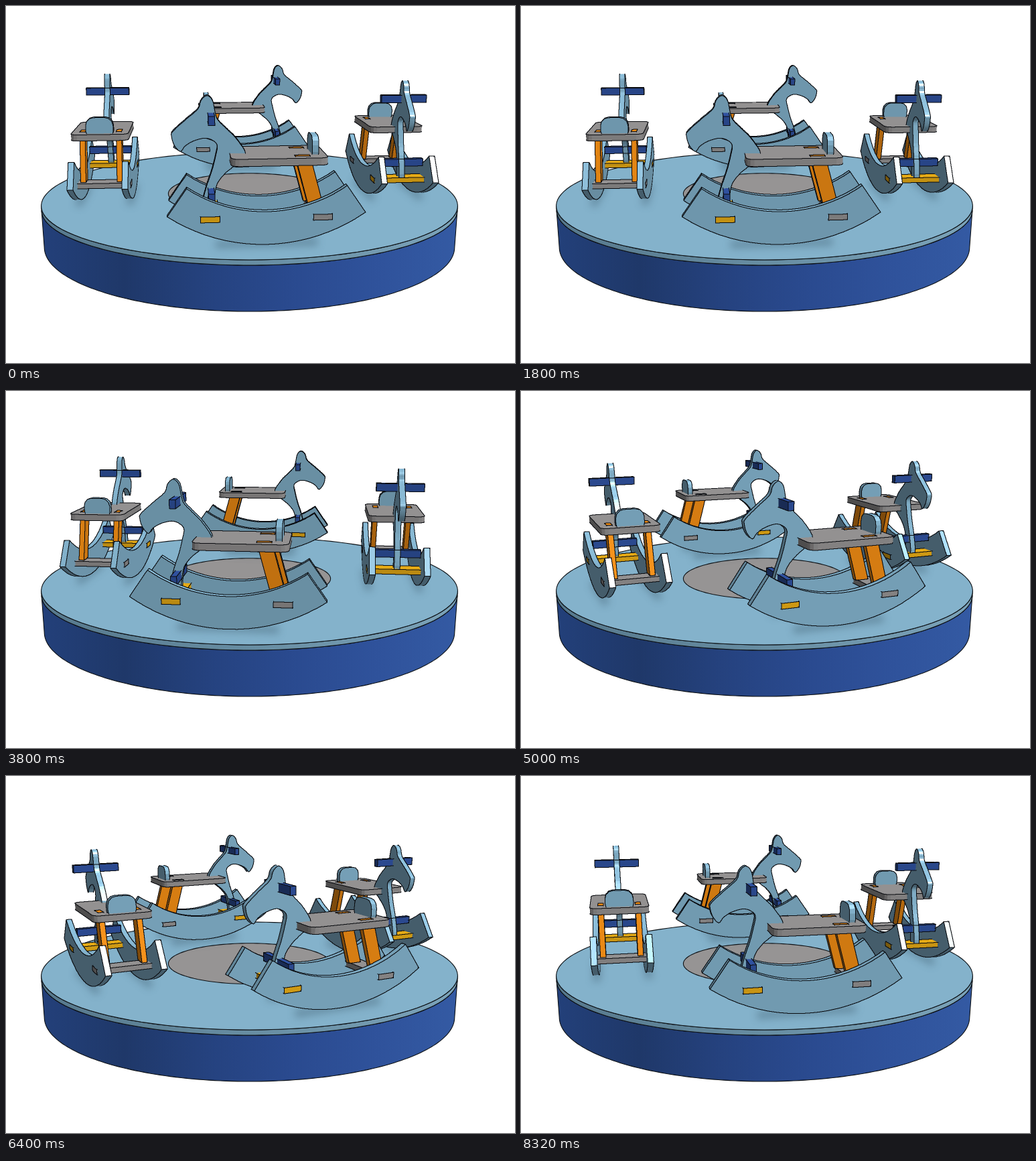
Animation of 760x533 px, one loop 8630 ms. Source, as an HTML page with a canvas:

```html
<!DOCTYPE html>
<html lang="en">
<head>
<meta charset="utf-8">
<title>Rocking horse carousel</title>
<style>
html, body { margin: 0; width: 100%; height: 100%; overflow: hidden; background: #fff; }
canvas { display: block; }
</style>
</head>
<body>
<canvas id="stage" width="760" height="533"></canvas>
<script>
const ctx = document.getElementById('stage').getContext('2d');
const LOOP = 8630, HOLD = 200, RAD = Math.PI / 180;

// Camera: platform radius is 1, origin at the centre of its top
const F = 1078, CX = 363.5, CY = 276.85, DIST = 3.6, SIN = 0.2493, COS = 0.9685;
const toCam = (x, y, z) => [x, y * SIN + z * COS, DIST + y * COS - z * SIN];
const toScreen = p => [CX + F * p[0] / p[2], CY - F * p[1] / p[2]];

const SKY = [131, 178, 204], GREY = [148, 146, 146], GOLD = [232, 172, 22],
      ORANGE = [240, 140, 20], NAVY = [48, 82, 160];

// ---- Horse mesh, local axes: u forward, w outward, z up ----
const faces = [], edges = [];
const AXES = {
  u: (p, q, h) => [h, p, q],
  w: (p, q, h) => [p, h, q],
  z: (p, q, h) => [p, q, h]
};

function prism(poly, axis, a, b, color) {
  const n = poly.length;
  const lo = poly.map(([p, q]) => AXES[axis](p, q, a));
  const hi = poly.map(([p, q]) => AXES[axis](p, q, b));
  faces.push({ pts: lo, color }, { pts: hi, color });
  for (let i = 0; i < n; i++) {
    const j = (i + 1) % n, [x, y] = poly[i];
    const prev = poly[(i + n - 1) % n], next = poly[j];
    faces.push({ pts: [lo[i], lo[j], hi[j], hi[i]], color });
    edges.push([lo[i], lo[j]], [hi[i], hi[j]]);
    const turn = Math.atan2(next[1] - y, next[0] - x) - Math.atan2(y - prev[1], x - prev[0]);
    if (Math.cos(turn) < 0.6) edges.push([lo[i], hi[i]]);
  }
}

const rect = (x0, y0, x1, y1) => [[x0, y0], [x1, y0], [x1, y1], [x0, y1]];

function roundRect(x0, y0, x1, y1, r) {
  const pts = [];
  [[x1 - r, y1 - r], [x0 + r, y1 - r], [x0 + r, y0 + r], [x1 - r, y0 + r]].forEach(([x, y], i) => {
    for (let k = 0; k < 4; k++) {
      const a = (i * 90 + k * 30) * RAD;
      pts.push([x + r * Math.cos(a), y + r * Math.sin(a)]);
    }
  });
  return pts;
}

// Closed Catmull-Rom curve through the points
function smooth(pts, parts = 4) {
  const n = pts.length, out = [];
  for (let i = 0; i < n; i++) {
    const [a, b, c, d] = [-1, 0, 1, 2].map(k => pts[(i + k + n) % n]);
    for (let s = 0; s < parts; s++) {
      const t = s / parts;
      out.push([0, 1].map(m => b[m] + 0.5 * t * (c[m] - a[m] +
        t * (2 * a[m] - 5 * b[m] + 4 * c[m] - d[m] + t * (3 * (b[m] - c[m]) + d[m] - a[m])))));
    }
  }
  return out;
}

function rocker() {
  const pts = [];
  for (let a = -35; a <= 35; a += 3.5) pts.push([0.668, a]);
  for (let a = 35; a >= -35; a -= 3.5) pts.push([0.536, a]);
  return pts.map(([r, a]) => [r * Math.sin(a * RAD), 0.668 - r * Math.cos(a * RAD)]);
}

const head = smooth([
  [.219, .564], [.234, .559], [.247, .543], [.258, .513], [.303, .475], [.356, .428],
  [.361, .408], [.352, .375], [.329, .349], [.310, .370], [.278, .389], [.234, .400],
  [.203, .391], [.185, .370], [.191, .333], [.207, .271], [.232, .198], [.248, .117],
  [.206, .117], [.198, .168], [.187, .217], [.157, .257], [.123, .285], [.074, .330],
  [.109, .394], [.148, .435], [.181, .469], [.191, .495], [.201, .545]
]);

for (const side of [-1, 1]) {
  prism(rocker(), 'w', side * 0.105, side * 0.131, SKY);
  prism([[-.229, .117], [-.171, .117], [-.110, .3395], [-.168, .3395]], 'w', side * 0.07, side * 0.094, ORANGE);
}
prism(rect(.183, .094, .257, .117), 'w', -.133, .133, GOLD);
prism(rect(-.253, .094, -.179, .117), 'w', -.133, .133, GREY);
prism(head, 'w', -.013, .013, SKY);
prism(rect(.197, .464, .221, .498), 'w', -.105, .105, NAVY);
prism(rect(.200, .165, .224, .199), 'w', -.105, .105, NAVY);
prism(roundRect(-.235, -.128, .137, .128, .03), 'z', .31, .338, GREY);
prism(roundRect(-.061, .312, .061, .410, .036), 'u', -.206, -.181, SKY);

// ---- Depth-buffered drawing at double size ----
const W = 1520, H = 1066;
const layer = Object.assign(document.createElement('canvas'), { width: W, height: H });
const lctx = layer.getContext('2d');
const image = lctx.createImageData(W, H);
const pixels = new Uint32Array(image.data.buffer);
const depth = new Float32Array(W * H);
const LIGHT = [0.42, 0.65, -0.63], INK = 0xff100c0a;

const dot = (a, b) => a[0] * b[0] + a[1] * b[1] + a[2] * b[2];
const unit = a => { const l = Math.hypot(...a); return a.map(v => v / l); };

function shade(color, n, p) {
  const view = unit(p).map(v => -v);
  const half = unit(view.map((v, i) => v + LIGHT[i]));
  const diffuse = 0.6 + 0.5 * Math.max(-0.15, dot(n, LIGHT));
  const gloss = 130 * Math.max(0, dot(n, half)) ** 60;
  const [r, g, b] = color.map(c => Math.min(255, Math.round(c * diffuse + gloss)));
  return (0xff000000 | b << 16 | g << 8 | r) >>> 0;
}

function fillFace(pts, color) {
  let n = [0, 0, 0];
  pts.forEach((a, i) => {
    const b = pts[(i + 1) % pts.length];
    n[0] += (a[1] - b[1]) * (a[2] + b[2]);
    n[1] += (a[2] - b[2]) * (a[0] + b[0]);
    n[2] += (a[0] - b[0]) * (a[1] + b[1]);
  });
  n = unit(n);
  let k = dot(n, pts[0]);
  if (Math.abs(k) < 0.008) return;
  if (k > 0) { n = n.map(v => -v); k = -k; }
  const ink = shade(color, n, pts[0]);
  const limit = 1 / Math.min(...pts.map(p => p[2]));
  const scr = pts.map(p => toScreen(p).map(v => v * 2));
  const ys = scr.map(p => p[1]);
  const top = Math.max(0, Math.ceil(Math.min(...ys) - 0.5));
  const end = Math.min(H, Math.ceil(Math.max(...ys) - 0.5));
  const step = n[0] / (2 * F * k);
  for (let y = top; y < end; y++) {
    const yc = y + 0.5, cuts = [];
    for (let i = 0, j = scr.length - 1; i < scr.length; j = i++) {
      const a = scr[i], b = scr[j];
      if ((a[1] <= yc) !== (b[1] <= yc)) cuts.push(a[0] + (yc - a[1]) / (b[1] - a[1]) * (b[0] - a[0]));
    }
    cuts.sort((a, b) => a - b);
    const base = (n[0] * (0.25 - CX) / F + n[1] * (CY - yc / 2) / F + n[2]) / k;
    for (let c = 0; c + 1 < cuts.length; c += 2) {
      const x1 = Math.min(W, Math.ceil(cuts[c + 1] - 0.5));
      for (let x = Math.max(0, Math.ceil(cuts[c] - 0.5)); x < x1; x++) {
        const near = Math.min(limit, base + step * x), at = y * W + x;
        if (near > depth[at]) { depth[at] = near; pixels[at] = ink; }
      }
    }
  }
}

function drawEdge(p, q) {
  const a = toScreen(p), b = toScreen(q);
  const dx = 2 * (b[0] - a[0]), dy = 2 * (b[1] - a[1]);
  const n = Math.ceil(Math.max(Math.abs(dx), Math.abs(dy), 1));
  for (let i = 0; i <= n; i++) {
    const t = i / n;
    const near = 1.003 * ((1 - t) / p[2] + t / q[2]);
    const x = Math.round(2 * a[0] + dx * t) - 1, y = Math.round(2 * a[1] + dy * t) - 1;
    if (x < 0 || y < 0 || x > W - 2 || y > H - 2) continue;
    const at = y * W + x;
    for (const o of [at, at + 1, at + W, at + W + 1]) if (near > depth[o]) pixels[o] = INK;
  }
}

// ---- Platform ----
function arc(r, z, from, to) {
  const pts = [];
  for (let i = 0; i <= 120; i++) {
    const a = (from + (to - from) * i / 120) * RAD;
    pts.push(toScreen(toCam(r * Math.sin(a), -r * Math.cos(a), z)));
  }
  return pts;
}

function trace(pts) {
  ctx.beginPath();
  pts.forEach(p => ctx.lineTo(...p));
}

function paint(pts, fill) {
  trace(pts);
  ctx.closePath();
  ctx.fillStyle = fill;
  ctx.fill();
  ctx.stroke();
}

function gradient(...colors) {
  const g = ctx.createLinearGradient(52, 0, 675, 0);
  colors.forEach((c, i) => g.addColorStop(i / (colors.length - 1), c));
  return g;
}

const band = (z0, z1) => [...arc(1, z0, -74.4, 74.4), ...arc(1, z1, 74.4, -74.4)];
const sideFill = gradient('#23407a', '#1f3869', '#25427f', '#2a4a8f', '#2f529b', '#345aa3');
const rimFill = gradient('#56788c', '#678da2', '#7ba3b9');

// ---- Motion ----
const RHO = 0.696, START = 4.8;
const KEYS = [[0, 0], [1800, 90], [2800, 135.6], [3800, 190.8], [5000, 253.3], [6400, 338.8], [8320, 442.9]];

function turnAt(t) {
  const i = Math.max(1, KEYS.findIndex(k => k[0] >= t));
  const [t0, a0] = KEYS[i - 1], [t1, a1] = KEYS[i];
  return a0 + (a1 - a0) * (t - t0) / (t1 - t0);
}

function placer(angle) {
  const s = Math.sin(angle * RAD), c = Math.cos(angle * RAD);
  return ([u, w, z]) => toCam((RHO + w) * s - u * c, -(RHO + w) * c - u * s, z);
}

function draw(t) {
  const horses = [0, 90, 180, 270].map(a => placer(START - turnAt(t) + a));
  ctx.fillStyle = '#fff';
  ctx.fillRect(0, 0, 760, 533);
  ctx.strokeStyle = '#0c1014';
  ctx.lineWidth = 1.1;
  paint(band(-0.0208, -0.2028), sideFill);
  paint(band(0, -0.0208), rimFill);
  paint(arc(1, 0, 0, 360), '#84b2cb');
  paint(arc(0.402, 0, 0, 360), '#969494');

  // Soft contact shadows
  ctx.save();
  trace(arc(1, 0, 0, 360));
  ctx.clip();
  ctx.filter = 'blur(6px)';
  ctx.strokeStyle = 'rgba(40, 62, 78, 0.32)';
  ctx.lineWidth = 11;
  for (const at of horses) for (const w of [-0.118, 0.118]) {
    trace([-0.2, 0.2].map(u => toScreen(at([u, w, 0]))));
    ctx.stroke();
  }
  ctx.restore();

  pixels.fill(0);
  depth.fill(0);
  for (const at of horses) for (const f of faces) fillFace(f.pts.map(at), f.color);
  for (const at of horses) for (const [a, b] of edges) drawEdge(at(a), at(b));
  lctx.putImageData(image, 0, 0);
  ctx.drawImage(layer, 0, 0, 760, 533);
}

let shown = -1;
function tick() {
  const t = performance.now() % LOOP;
  const step = t >= 8320 ? 8320 : Math.min(8000, Math.floor(t / HOLD) * HOLD);
  if (step !== shown) draw(shown = step);
  requestAnimationFrame(tick);
}
tick();
</script>
</body>
</html>
```
